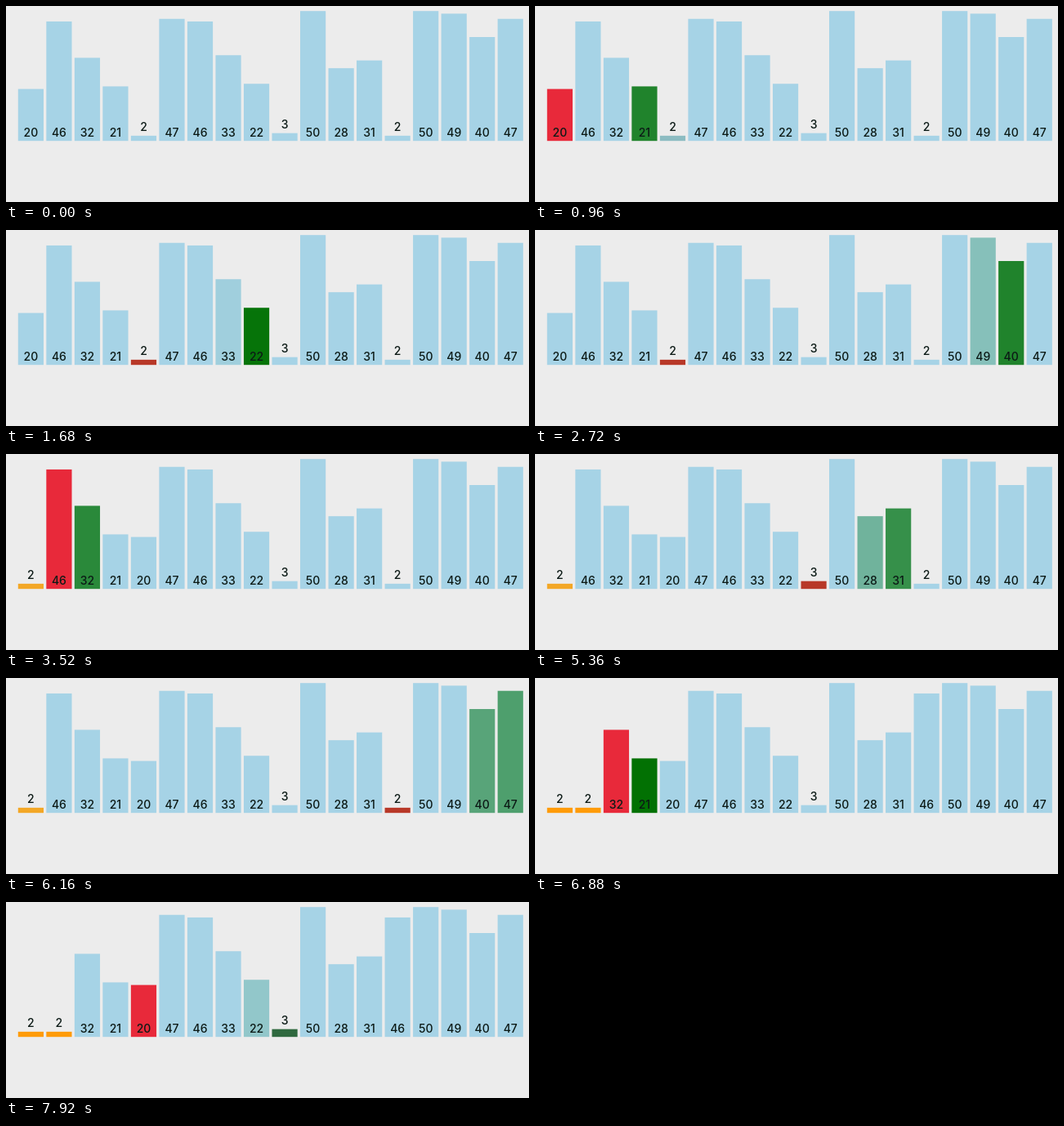
Write an HTML page with a canvas that moves like this. It is 640 by 240 pixels and loops after 8000 ms.

```html
<!DOCTYPE html>
<html lang="en">
<head>
<meta charset="utf-8">
<title>Selection sort</title>
<style>
  html, body { margin: 0; width: 100%; height: 100%; overflow: hidden; background: #ececec; }
  canvas { display: block; width: 640px; height: 240px; }
</style>
</head>
<body>
<canvas id="stage" width="640" height="240"></canvas>
<script>
const ctx = document.getElementById('stage').getContext('2d');
const LOOP = 8000;
const LEFT = 14.8, PITCH = 34.52, WIDTH = 31.2, BASE = 165.2, UNIT = 3.18;
const values = [20, 46, 32, 21, 2, 47, 46, 33, 22, 3, 50, 28, 31, 2, 50, 49, 40, 47];

const BLUE = [166, 211, 230], GREEN = [0, 112, 0], RED = [232, 41, 58];
const DARK_GREEN = [31, 90, 40], DARK_RED = [184, 56, 40];
const AMBER = [243, 167, 38], ORANGE = [255, 155, 8];

// Pace of playback: [time in ms, step]
const pace = [[0, -1.87], [382, 1], [1680, 10.78], [2720, 18.63], [4320, 30.56],
              [5360, 38.56], [6880, 49.85], [7920, 57.68], [8000, 58.28]];

// Every step of the sort, as the place and colour of each bar
function sortSteps(passes) {
  const order = values.map((_, i) => i);
  const steps = [];
  let done = 0;

  function push(reds = [], green = -1) {
    const bars = [];
    order.forEach((id, pos) => {
      const small = values[id] < 4;
      let color = BLUE;
      if (pos < done) color = done > 1 ? ORANGE : AMBER;
      else if (reds.includes(pos)) color = small ? DARK_RED : RED;
      else if (pos === green) color = small ? DARK_GREEN : GREEN;
      bars[id] = { pos, color };
    });
    steps.push(bars);
  }

  push();
  for (let i = 0; i < passes; i++) {
    let min = i;
    push([min]);
    for (let j = i + 1; j < order.length; j++) {
      push([min], j);
      if (values[order[j]] < values[order[min]]) {
        min = j;
        push([min]);
      }
    }
    if (min !== i) {
      push([i, min]);
      [order[i], order[min]] = [order[min], order[i]];
      push([i, min]);
    }
    done++;
    push();
  }
  return steps;
}

const steps = sortSteps(3);
const mix = (a, b, k) => a + (b - a) * k;
const ease = p => p < 0.5 ? 4 * p ** 3 : 1 - 4 * (1 - p) ** 3;

function stepAt(t) {
  let i = 1;
  while (i < pace.length - 1 && t > pace[i][0]) i++;
  const [t0, s0] = pace[i - 1], [t1, s1] = pace[i];
  return mix(s0, s1, (t - t0) / (t1 - t0));
}

function drawBar(value, pos, color) {
  const x = LEFT + pos * PITCH, h = value * UNIT;
  ctx.fillStyle = `rgb(${color.map(Math.round).join()})`;
  ctx.fillRect(x, BASE - h, WIDTH, h);
  ctx.fillStyle = '#0c1a16';
  ctx.fillText(value, x + WIDTH / 2, h < 16 ? BASE - h - 5.7 : 160);
}

function draw(t) {
  const s = Math.max(0, stepAt(t));
  const n = Math.floor(s);
  const from = steps[Math.max(0, n - 1)], to = steps[n];
  const k = ease(s - n);

  ctx.fillStyle = '#ececec';
  ctx.fillRect(0, 0, 640, 240);
  ctx.font = '500 14px Inter, "Liberation Sans", sans-serif';
  ctx.textAlign = 'center';
  values.forEach((value, id) => {
    const a = from[id], b = to[id];
    drawBar(value, mix(a.pos, b.pos, k), a.color.map((c, i) => mix(c, b.color[i], k)));
  });
}

const start = performance.now();
function tick() {
  draw((performance.now() - start) % LOOP);
  requestAnimationFrame(tick);
}
tick();
</script>
</body>
</html>
```
